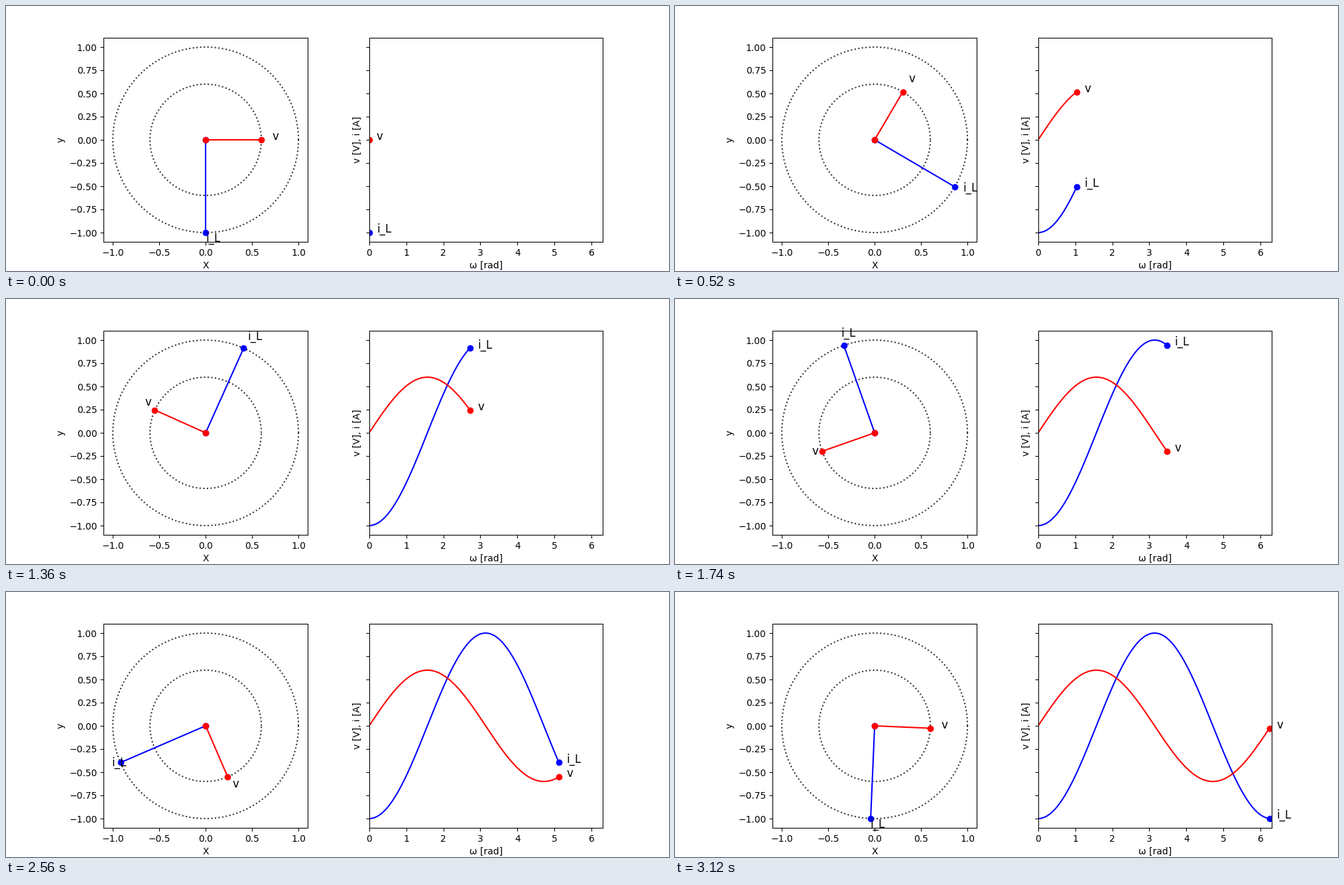
Write a matplotlib script that moves like this. It is 1000x400 px and loops after 3.14 s.

```python
import numpy as np
import matplotlib.pyplot as plt
from matplotlib.animation import FuncAnimation

STEP = 0.04      # radians per frame
FRAMES = 157
INTERVAL = 20    # ms

fig, (ax_phasor, ax_wave) = plt.subplots(1, 2, figsize=(10, 4), dpi=100, sharey=True)

ax_phasor.set_aspect("equal")
ax_phasor.set(xlim=(-1.1, 1.1), ylim=(-1.1, 1.1), xlabel="X", ylabel="y")
ax_wave.set(xlim=(0, 6.3), xlabel="ω [rad]", ylabel="v [V], i [A]")

turn = np.linspace(0, 2 * np.pi, 200)
for radius in (1.0, 0.6):
    ax_phasor.plot(radius * np.cos(turn), radius * np.sin(turn), "k:", alpha=0.8)


class Signal:
    """A rotating phasor and the sine wave it traces."""

    def __init__(self, name, color, amp, phase, label_scale):
        self.amp, self.phase, self.label_scale = amp, phase, label_scale
        self.arm, = ax_phasor.plot([], [], "o-", color=color)
        self.wave, = ax_wave.plot([], [], color=color)
        self.dot, = ax_wave.plot([], [], "o", color=color)
        self.arm_label = ax_phasor.text(0, 0, name, fontsize=12)
        self.dot_label = ax_wave.text(0, 0, name, fontsize=12)

    def update(self, t):
        angle = t + self.phase
        x, y = self.amp * np.cos(angle[-1]), self.amp * np.sin(angle[-1])
        self.arm.set_data([0, x], [0, y])
        self.arm_label.set_position((x * self.label_scale, y * self.label_scale))
        self.wave.set_data(t, self.amp * np.sin(angle))
        self.dot.set_data([t[-1]], [y])
        self.dot_label.set_position((t[-1] + 0.2, y))
        return self.arm, self.wave, self.dot, self.arm_label, self.dot_label


signals = [
    Signal("i_L", "blue", 1.0, -np.pi / 2, 1.1),
    Signal("v", "red", 0.6, 0.0, 1.2),
]


def update(frame):
    t = STEP * np.arange(frame + 1)
    return [artist for signal in signals for artist in signal.update(t)]


anim = FuncAnimation(fig, update, frames=FRAMES, interval=INTERVAL,
                     init_func=lambda: update(0), repeat=True, repeat_delay=0)
plt.show()
```
